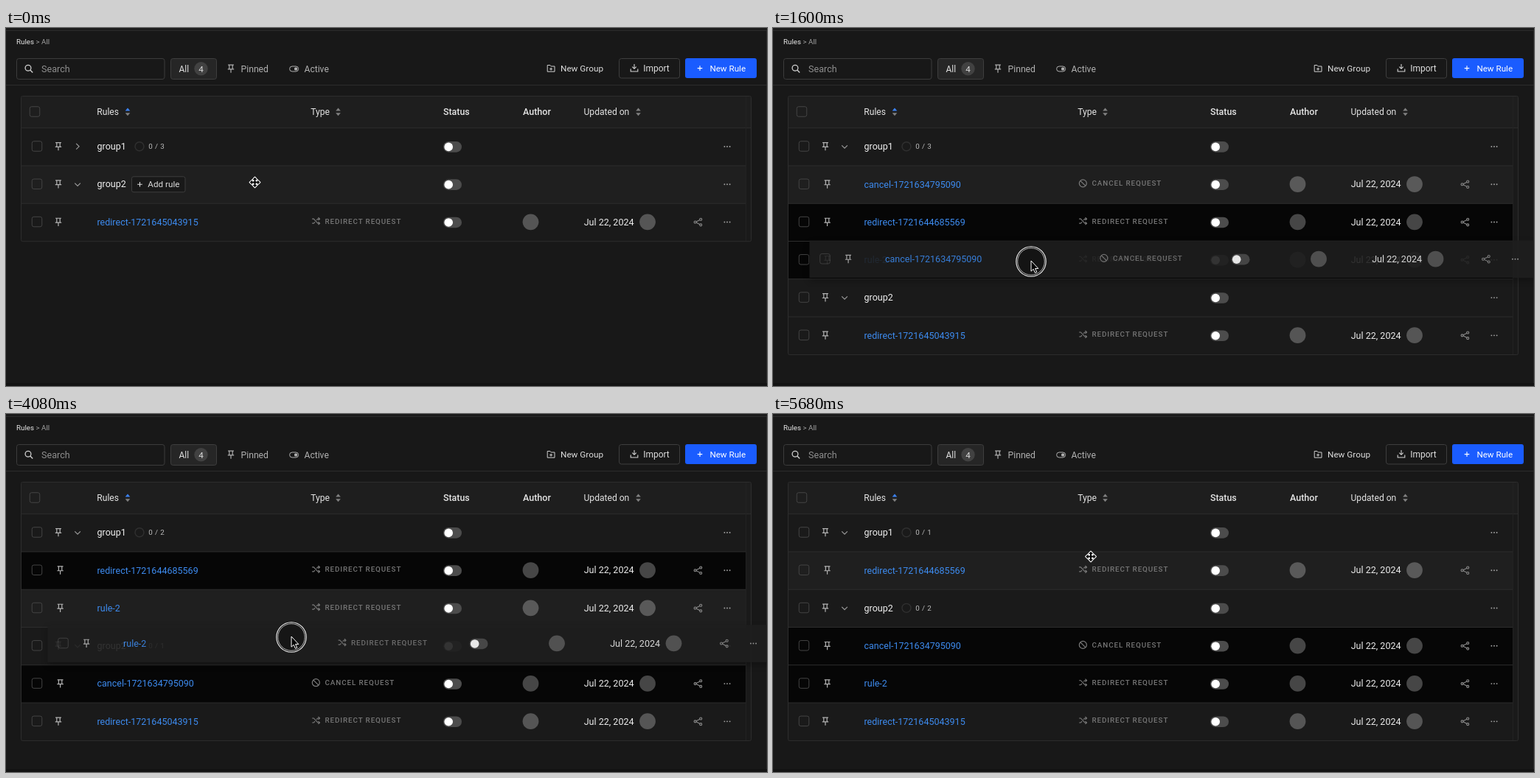
These frames come from a looping animation (1032 by 486 pixels, 5.76 s). An HTML page:

```html
<!DOCTYPE html>
<html lang="en">
<head>
<meta charset="utf-8">
<title>Rules</title>
<style>
html, body { margin: 0; width: 100%; height: 100%; overflow: hidden; background: #181818; }
svg { display: block; font-family: Roboto, sans-serif; }
.ghost { filter: drop-shadow(0 4px 5px rgba(0, 0, 0, .3)); }
</style>
</head>
<body>
<svg id="stage" width="1032" height="486" viewBox="0 0 1032 486">
  <g id="chrome"></g>
  <g id="table"></g>
</svg>
<script>
const LOOP = 5760, STEP = 80;
const TOP = 135.7, PITCH = 51.27, LEFT = 21, RIGHT = 1003;

// Drawing helpers
const text = (x, y, s, size, fill, extra = '') =>
  `<text x="${x}" y="${y}" font-size="${size}" fill="${fill}" ${extra}>${s}</text>`;
const rect = (x, y, w, h, r, fill, stroke = 'none') =>
  `<rect x="${x}" y="${y}" width="${w}" height="${h}" rx="${r}" fill="${fill}" stroke="${stroke}"/>`;
const circle = (x, y, r, fill, stroke = 'none', sw = 1) =>
  `<circle cx="${x}" cy="${y}" r="${r}" fill="${fill}" stroke="${stroke}" stroke-width="${sw}"/>`;
const line = (d, stroke, sw = 1.2) =>
  `<path d="${d}" fill="none" stroke="${stroke}" stroke-width="${sw}"/>`;
const at = (x, y, body, extra = '') => `<g transform="translate(${x} ${y})" ${extra}>${body}</g>`;

// Icons, centred on their position
const pin = (x, y, c = '#b4b4b4') =>
  at(x, y, line('M-3.9-4.9H3.9M-2.2-4.9V.4M2.2-4.9V.4M-4.2 .9H4.2M0 1V5.8', c));
const box = (x, y) => rect(x - 6.75, y - 6.75, 13.5, 13.5, 2.5, 'none', '#444');
const plus = (x, y, c) => at(x, y, line('M-3.3 0H3.3M0-3.3V3.3', c, 1.1));
const toggle = y => rect(593, y - 7, 25, 14.6, 7.3, '#4c4c4c') + circle(600.2, y + .3, 5.8, '#fff');
const dots = (x, y) => [-3.6, 0, 3.6].map(d => circle(x + d, y, .95, '#a0a0a0')).join('');
const share = (x, y) => at(x, y, line('M3.6-3.6L-3.6 0L3.6 3.6', '#8c8c8c', 1.1) +
  [[3.7, -3.8], [-3.9, 0], [3.7, 3.8]].map(p => circle(...p, 1.5, '#1a1a1a', '#8c8c8c', 1.1)).join(''));
const shuffle = (x, y) => at(x, y, line(
  'M-5.2-3H-3L2.6 3H5M-5.2 3H-3L-1.2 1.2M.8-1.2L2.6-3H5M3.2-5L5.2-3L3.2-1.1M3.2 1.1L5.2 3L3.2 5', '#7c7c7c', 1.1));
const ban = (x, y) => at(x, y, circle(0, 0, 5, 'none', '#7c7c7c', 1.2) + line('M-3.5-3.5L3.5 3.5', '#7c7c7c'));
const sorter = (x, up) => `<path d="M${x - 3.3} 112.6h6.6l-3.3-4z" fill="${up}"/>` +
  `<path d="M${x - 3.3} 115.2h6.6l-3.3 4z" fill="#808080"/>`;
const avatar = (x, y) => circle(x, y, 10.9, 'rgba(255,255,255,.26)');

function chrome() {
  const soft = '#b0b0b0', lit = '#dedede', head = '#e4e4e4';
  return rect(0, 0, 1032, 486, 0, '#181818') +
    rect(0, 0, 1032, 3, 0, '#1b1b1b') + line('M0 3.5H1032', '#2c2c2c', 1) +
    rect(0, 482, 1032, 4, 0, '#131313') + line('M1031.5 4V482', '#262626', 1) +
    text(14, 21.7, 'Rules', 9.8, '#e6e6e6') +
    text(40.5, 21.7, '&gt; All', 9.8, '#a2a2a2') +
    rect(14.5, 41.5, 200.5, 28, 3, '#181818', '#3c3c3c') +
    circle(30, 54.2, 3.9, 'none', '#d0d0d0', 1.3) + line('M32.8 57L36.2 60.4', '#d0d0d0', 1.4) +
    text(48, 59.6, 'Search', 12.6, '#8e8e8e') +
    rect(223.5, 41.5, 62, 28, 3, '#262626', '#3e3e3e') +
    text(234.5, 59.5, 'All', 12, lit) + circle(264.5, 55.3, 9.2, '#414141') +
    text(264.5, 59.5, '4', 11.6, lit, 'text-anchor="middle"') +
    pin(305, 55, soft) + text(318.5, 59.6, 'Pinned', 12.2, soft) +
    rect(384.6, 52, 12, 7, 3.5, 'none', soft) + rect(391, 53.5, 4.2, 4, 1.5, soft) +
    text(404.5, 59.6, 'Active', 12.1, soft) +
    line('M734.2 50.5H738L739.3 52H744V59.2H734.2ZM739.1 53.7V57.7M737.1 55.7H741.1', '#cfcfcf', 1) +
    text(752, 58.7, 'New Group', 11.75, lit) +
    rect(831.5, 41.5, 82, 26.5, 3, '#181818', '#3e3e3e') +
    line('M852 49V55.2M849.3 52.6L852 55.3L854.7 52.6M847.2 55.4V59H856.8V55.4', '#d4d4d4', 1.1) +
    text(864.3, 58.7, 'Import', 11.95, lit) +
    rect(921, 41, 97, 27, 3, '#1a5cff') + plus(941, 54.6, '#fff') +
    text(954.4, 58.7, 'New Rule', 11.65, '#fff') +
    line('M0 77.5H1032', '#2c2c2c', 1) +
    rect(LEFT - .5, 93, 990, 43, 2, '#1e1e1e') +
    box(39, 113.5) + text(123.3, 118.2, 'Rules', 12.1, head) + sorter(165, '#3b82f6') +
    text(413.2, 118.2, 'Type', 12.1, head) + sorter(450.5, '#808080') +
    text(593, 118.2, 'Status', 12.4, head, 'font-weight="500"') +
    text(701, 118.2, 'Author', 12.5, head, 'font-weight="500"') +
    text(783.5, 118.2, 'Updated on', 12.1, head) + sorter(857.5, '#808080');
}

const RULES = {
  c: { name: 'cancel-1721634795090', cancel: true },
  r: { name: 'redirect-1721644685569' },
  s: { name: 'rule-2' },
  u: { name: 'redirect-1721645043915', loose: true }
};

// Row order over time; a digit after a group name is its rule count
const LAYOUTS = [
  [0, 'group1:3 group2 u'],
  [640, 'group1:3 c r s group2 u'],
  [2400, 'group1:2 r s group2:1 c u'],
  [5040, 'group1:1 r group2:2 c s u']
];
const DRAGS = [
  { id: 'c', press: 1200, start: 1280, end: 1840, row: 1 },
  { id: 's', press: 3840, start: 3920, end: 4560, row: 2 }
];
const PATH = [
  [0, 337.5, 209.5], [80, 338, 204], [320, 343, 178.5], [640, 343, 178.5],
  [800, 338, 188], [1120, 321.5, 215.5], [1200, 321.5, 215.5], [1280, 334, 226],
  [1360, 355, 249], [1520, 356, 296], [1680, 344, 338], [1760, 338, 351.5],
  [2480, 338, 351.5], [2800, 362, 356], [3200, 391, 343], [3280, 389.5, 293],
  [3440, 374, 272], [3760, 351.5, 255], [3840, 351.5, 255], [3920, 370, 268],
  [4080, 387, 303], [4240, 386, 340], [4400, 382, 367], [4560, 380, 372],
  [5040, 380, 372], [5200, 408, 282], [5360, 424, 216], [5520, 430, 198], [5640, 431, 193.5]
];

function pointer(t) {
  const i = PATH.findIndex(k => k[0] > t);
  if (i < 0) return PATH[PATH.length - 1].slice(1);
  if (i === 0) return PATH[0].slice(1);
  const [a, b] = [PATH[i - 1], PATH[i]], f = (t - a[0]) / (b[0] - a[0]);
  return [1, 2].map(n => a[n] + (b[n] - a[n]) * f);
}

const dragAt = t => DRAGS.find(d => t >= d.press && t < d.end);

function hovered(t) {
  const drag = dragAt(t);
  return drag ? drag.row : Math.floor((pointer(t)[1] - TOP) / PITCH);
}

// Share of the last 200 ms the pointer spent on a row: a soft hover fade
function heat(row, t) {
  let n = 0;
  for (let k = 0; k < 6; k++) n += hovered(t - k * 40) === row;
  return n / 6;
}

function groupRow(id, y, hot, open) {
  const [name, count] = id.split(':');
  const x = count ? 226.5 : 170.5;
  let s = box(42, y - .3) + pin(71, y - .3) +
    line(open ? `M93.3 ${y - 1.5}l3.8 3.8 3.8-3.8` : `M95.2 ${y - 3.9}l3.9 3.9-3.9 3.9`, '#9a9a9a') +
    text(123.5, y + 4.3, name, 12.5, '#f2f2f2') + toggle(y + .3) + dots(978, y + .2);
  if (count) s += circle(181, y, 6, 'none', '#303030', 1.4) +
    text(193.3, y + 3.4, '0 / ' + count, 9.8, '#bcbcbc', 'letter-spacing=".4"');
  if (hot) s += rect(x, y - 10.3, 72.5, 21, 2.5, '#191919', '#3c3c3c') +
    plus(x + 11, y + .2, '#dcdcdc') + text(x + 21.8, y + 4.1, 'Add rule', 11.7, '#dcdcdc');
  return s;
}

function ruleRow(id, y, faces) {
  const { name, cancel, loose } = RULES[id];
  return box(42, y - .3) + pin(loose ? 71 : 73.6, y - .2) +
    text(123.5, y + 4.5, name, 12.52, '#3d8bef') +
    (cancel ? ban : shuffle)(420.3, y - 1.2) +
    text(432.5, y + 2.3, (cancel ? 'CANCEL' : 'REDIRECT') + ' REQUEST', 9.8, '#777',
      'font-weight="500" letter-spacing=".92"') +
    toggle(y + .3) + (faces ? avatar(711.5, y) + avatar(870, y) : '') +
    text(783.7, y + 4.4, 'Jul 22, 2024', 12.55, '#ececec') + share(938.5, y + .2) + dots(978, y + .2);
}

function cursor(t, drag) {
  const [x, y] = pointer(t);
  const ring = drag ? circle(0, 0, 20.2, 'rgba(0,0,0,.25)', '#f4f4f4', 1.1) +
    circle(0, 0, 18.3, 'none', '#d8d8d8', .8) : '';
  const arrow = '<path d="M0-1V13.2l3.2-2.9 2.2 5 2.3-1-2.2-4.8h4.3z" fill="#000" stroke="#fff"/>';
  const head = 'M0-6.8L2.9-3.6H1V-1H3.6V-2.9L6.8 0L3.6 2.9V1H1V3.6H2.9L0 6.8L-2.9 3.6H-1V1H-3.6V2.9L-6.8 0L-3.6-2.9V-1H-1V-3.6H-2.9Z';
  const move = `<path d="${head}" fill="#000" stroke="#fff" stroke-width="2.2" stroke-linejoin="round"/>` +
    `<path d="${head}" fill="#000"/>`;
  return at(x, y, ring + (drag && t >= drag.start ? arrow : move));
}

function table(t) {
  const rows = LAYOUTS.filter(l => l[0] <= t).pop()[1].split(' ');
  const drag = dragAt(t), hot = hovered(t);
  const bottom = TOP + rows.length * PITCH;
  let s = rect(LEFT, TOP, 990, bottom - TOP, 0, '#1a1a1a');
  rows.forEach((id, i) => {
    const y = TOP + i * PITCH, mid = y + 25.1, rule = RULES[id];
    const base = rule && !rule.loose ? 6 : 26;
    const v = Math.round(base + (31 - base) * heat(i, t));
    s += rect(LEFT, y, RIGHT - LEFT, PITCH, 0, `rgb(${v},${v},${v})`) +
      (rule ? ruleRow(id, mid, rule.loose || t < 640 || t >= 720)
            : groupRow(id, mid, hot === i, t >= 640 || i > 0));
  });
  for (let i = 0; i < rows.length; i++)
    s += line(`M${LEFT} ${TOP + i * PITCH}H${i ? RIGHT : 1010.5}`, '#2d2d2d', 1);
  s += line(`M${RIGHT}.5 93V${bottom}`, '#222', 1) +
    rect(LEFT - .5, 92.5, 990, bottom - 92.3, 2, 'none', '#2d2d2d');
  if (drag && t >= drag.start) {
    const [x, y] = pointer(t), [x0, y0] = pointer(drag.press);
    const top = TOP + drag.row * PITCH;
    s += at(x - x0, y - y0, rect(LEFT, top, RIGHT - LEFT, PITCH - .6, 0, '#1e1e1e') +
      ruleRow(drag.id, top + 25.1, true), 'class="ghost" opacity=".9"');
  }
  return s + cursor(t, drag);
}

document.getElementById('chrome').innerHTML = chrome();
const layer = document.getElementById('table');
let shown = -1;

function frame() {
  const t = Math.floor((performance.now() % LOOP) / STEP) * STEP;
  if (t !== shown) layer.innerHTML = table(shown = t);
  requestAnimationFrame(frame);
}
frame();
</script>
</body>
</html>
```
